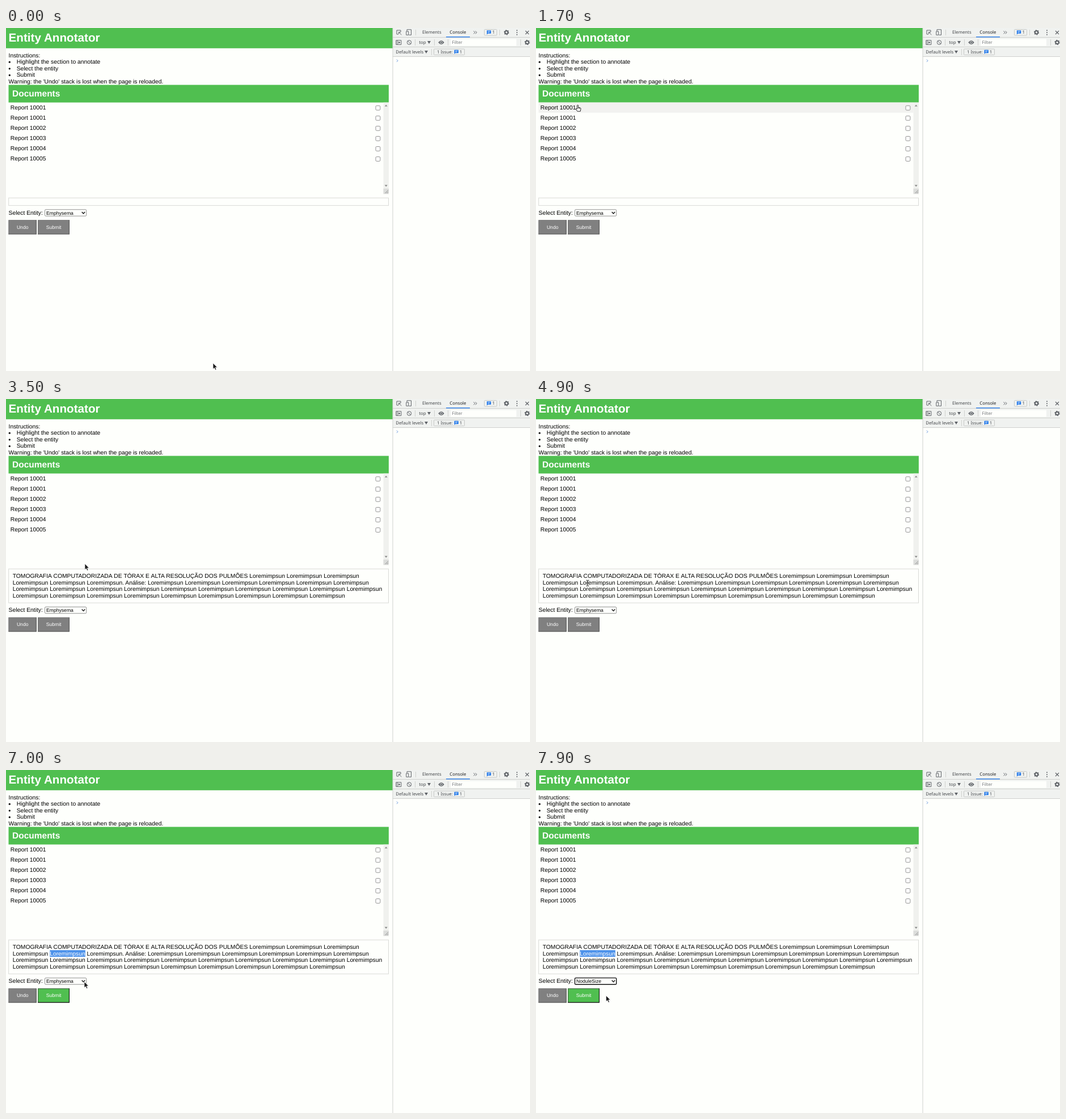
Animation, 924 px wide and 606 px high, one loop 8000 ms. Source, as an HTML page:

```html
<!DOCTYPE html>
<html lang="en">
<head>
<meta charset="utf-8">
<title>Entity Annotator</title>
<style>
  html, body { margin: 0; width: 100%; height: 100%; overflow: hidden; background: #fefffc; }
  svg { display: block; width: 924px; height: 606px; }
  text { font: 10.34px "Liberation Sans", Arial, sans-serif; fill: #000; text-rendering: geometricPrecision; white-space: pre; }
  .title { font-size: 20.67px; font-weight: bold; fill: #fff; }
  .heading { font-size: 15.5px; font-weight: bold; fill: #fff; }
  .control { font-size: 8.62px; }
  .button { font-size: 8.62px; fill: #fff; text-anchor: middle; }
  .caps { word-spacing: .22px; }
  .tools text { font: 7.75px "Noto Sans", "Open Sans", sans-serif; fill: #44474a; }
  .icon { fill: none; stroke: #5f6368; stroke-width: 1; }
  .solid { fill: #5f6368; }
  .rule { stroke: #cfd1ce; stroke-width: 1; }
  .frame { fill: #fefffc; stroke: #d9dad7; }
  .select { fill: #fefffc; stroke: #767676; stroke-width: .8; }
  .select.hover { stroke: #444; }
  .select.focus { stroke: #101010; stroke-width: 1.4; }
</style>
</head>
<body>
<svg viewBox="0 0 924 606">
  <defs>
    <g id="gear">
      <circle r="2.7" class="icon" style="stroke-width:2"/>
      <circle r="3.9" class="icon" style="stroke-width:1.5" stroke-dasharray="1.75 2.334"/>
    </g>
    <path id="drop" class="solid" d="M-3 -2.4H3L0 2.6Z"/>
    <g id="note">
      <path fill="#1a73e8" d="M-3.5 -3.3H3.8V2.2H-1.6L-3.5 4Z"/>
      <path stroke="#fff" stroke-width=".8" d="M-2 -1.5H2.4M-2 .4H1.4"/>
    </g>
    <path id="arrow" d="M0 0V10.6L2.4 8.4 4.2 12.2 6 11.4 4.3 7.7H7.6Z" fill="#1c1c1c" stroke="#fff" stroke-width=".7"/>
    <path id="hand" d="M-1.1 .7Q0 -.7 1.1 .7V4.4L4.4 5Q5.6 5.4 5.4 7L4.6 11.2H-.6L-3.6 7.2Q-3 5.6 -1.1 7.2ZM1.1 4.4V6.4M3 4.8V6.6" fill="#fff" stroke="#111" stroke-width=".9"/>
    <path id="beam" d="M-2.6 -5H-.7L0 -4.4.7 -5H2.6M-2.6 5H-.7L0 4.4.7 5H2.6M0 -4.4V4.4" fill="none" stroke="#222" stroke-width="1"/>
  </defs>

  <rect width="924" height="606" fill="#fefffc"/>
  <rect width="682" height="35.8" fill="#50bf50"/>
  <text class="title" x="4.6" y="24">Entity Annotator</text>
  <g id="intro"></g>
  <rect x="4.5" y="100.5" width="670.4" height="31.1" fill="#50bf50"/>
  <text class="heading" x="11" y="121">Documents</text>

  <rect id="hover" x="4.5" width="661" height="18.05" fill="#f2f2f0"/>
  <g id="rows"></g>
  <rect x="665.5" y="131.6" width="9.4" height="161.6" fill="#f0f1ee"/>
  <path fill="#8b8c8a" d="M667.7 138.6H672.7L670.2 135.4ZM667.7 277.2H672.7L670.2 280.4Z"/>
  <rect x="665.5" y="283.7" width="9.4" height="9.6" fill="#dcdddb"/>
  <path d="M668.5 292L674 286.5M671.5 292L674 289.5" stroke="#777" stroke-width=".8"/>

  <rect id="paper" class="frame" x="4.7" y="300.2" width="669.8" height="13.4"/>
  <g id="report">
    <rect id="mark" x="77.3" y="318.3" width="62.6" height="11.7" fill="#4b91ea"/>
  </g>

  <g id="form">
    <text x="4.6" y="329.7">Select Entity:</text>
    <rect id="select" class="select" x="68.5" y="320.8" width="73.2" height="11.4" rx="1.6"/>
    <text id="value" class="control" x="71" y="329.6"></text>
    <path d="M133.7 324.9L136.5 327.8 139.3 324.9" fill="none" stroke="#222" stroke-width="1.5"/>
    <g id="buttons"></g>
  </g>

  <g id="menu">
    <rect x="67" y="380.5" width="77" height="58.5" rx="1" fill="#000" opacity=".12"/>
    <rect x="68" y="379.6" width="74" height="58.6" fill="#fff" stroke="#b8b8b8" stroke-width=".7"/>
    <rect id="choice" x="68.4" width="73.2" height="11.6" fill="#cecece"/>
  </g>

  <g class="tools">
    <rect x="682" width="242" height="50.5" fill="#f0f2f0"/>
    <path class="rule" d="M682 0V606M682 16.5H924M682 33.5H924M682 50.5H924M722.5 3V13M870.5 3V13M721.5 20V31M755.5 20V31M779.5 20V31M907.5 20V31M750.5 37V48"/>
    <path class="icon" d="M696 7V4H689V11H692M692.6 7.3L697.4 12M692.6 10.6V7.3H696"/>
    <path class="icon" d="M707 5.5V2.8H714.5V12.3H710.5M705.8 6H709.8V12.3H705.8Z"/>
    <text x="734" y="10.3">Elements</text>
    <text x="782.3" y="10.3" style="fill:#202124">Console</text>
    <rect x="776" y="15.2" width="42" height="1.3" fill="#1a73e8"/>
    <path class="icon" d="M824.5 5.3L827 7.8 824.5 10.3M827.7 5.3L830.2 7.8 827.7 10.3"/>
    <rect class="icon" x="843.5" y="2.5" width="22" height="10.5" rx="1" style="stroke:#c6c8c6"/>
    <use href="#note" x="851.4" y="7.5"/>
    <text x="857.6" y="10.3">1</text>
    <use href="#gear" x="882.5" y="7.8"/>
    <g class="solid"><circle cx="901" cy="4.3" r="1"/><circle cx="901" cy="8" r="1"/><circle cx="901" cy="11.7" r="1"/></g>
    <path class="icon" d="M916 5L922 11M922 5L916 11" style="stroke-width:1.2"/>

    <path class="icon" d="M687.8 21.8H696.8V29.3H687.8ZM690 21.8V29.3"/>
    <path class="solid" d="M692 23.4L695.6 25.6 692 27.8Z"/>
    <circle class="icon" cx="711" cy="25.5" r="3.7"/><path class="icon" d="M708.4 22.9L713.6 28.1"/>
    <text x="728.3" y="28.2">top</text>
    <use href="#drop" x="746" y="25.5"/>
    <path class="solid" d="M762.3 25.5Q767.5 18.5 772.7 25.5 767.5 32.5 762.3 25.5Z"/>
    <circle cx="767.5" cy="25.5" r="1.9" fill="#5f6368" stroke="#f0f2f0" stroke-width=".9"/>
    <rect x="784" y="19.5" width="116" height="12" fill="#fefffc"/>
    <text x="786.4" y="28.2" style="fill:#74777a">Filter</text>
    <use href="#gear" x="919" y="25.4"/>

    <text x="687.3" y="45">Default levels</text>
    <use href="#drop" x="741" y="42.3"/>
    <rect class="icon" x="754.5" y="37" width="54" height="10.6" rx="1" style="stroke:#c6c8c6"/>
    <text x="760" y="45">1 Issue:</text>
    <use href="#note" x="794" y="42"/>
    <text x="799.8" y="45">1</text>
    <path d="M688.8 55.6L691 57.8 688.8 60" fill="none" stroke="#6f9be0" stroke-width="1"/>
  </g>
  <use id="cursor"/>
</svg>

<script>
const LOOP = 8000, ROW = 18.05, LIST_TOP = 131.6, ITEM = 11.6, MENU_TOP = 379.9;
const $ = id => document.getElementById(id);

function append(parent, name, attrs, content = '') {
  const node = document.createElementNS('http://www.w3.org/2000/svg', name);
  for (const key in attrs) node.setAttribute(key, attrs[key]);
  node.textContent = content;
  return parent.appendChild(node);
}
const add = (id, ...rest) => append($(id), ...rest);

const intro = ['Instructions:', 'Highlight the section to annotate', 'Select the entity', 'Submit',
  "Warning: the 'Undo' stack is lost when the page is reloaded."];
intro.forEach((line, i) => {
  const bullet = i > 0 && i < 4, y = 51.55 + i * 11.63;
  if (bullet) add('intro', 'circle', { cx: 6.3, cy: y - 3, r: 1.6 });
  add('intro', 'text', { x: bullet ? 18.7 : 4.6, y }, line);
});

[1, 1, 2, 3, 4, 5].forEach((number, i) => {
  add('rows', 'text', { x: 7.8, y: 144 + i * ROW }, 'Report 1000' + number);
  add('rows', 'rect', { x: 652, y: 137.3 + i * ROW, width: 7.8, height: 7.8, rx: 1.6,
    fill: '#fff', stroke: '#767676', 'stroke-width': .8 });
});

const lorem = count => Array(count).fill('Loremimpsun').join(' ');
const caps = 'TOMOGRAFIA COMPUTADORIZADA DE TÓRAX E ALTA RESOLUÇÃO DOS PULMÕES ';
const lines = [0, 1, 2, 3].map(i => add('report', 'text', { x: 11.7, y: 316 + i * 11.65 }));
append(lines[0], 'tspan', { class: 'caps' }, caps);
append(lines[0], 'tspan', {}, lorem(3));
append(lines[1], 'tspan', {}, 'Loremimpsun ');
const marked = append(lines[1], 'tspan', {}, 'Loremimpsun');
append(lines[1], 'tspan', {}, ' Loremimpsun. Análise: ' + lorem(6));
lines[2].textContent = lorem(10);
lines[3].textContent = lorem(9);

function button(x, width, label) {
  const top = 339.3, bottom = 364.5, right = x + width;
  const face = add('buttons', 'rect', { x, y: top, width, height: bottom - top });
  const edge = d => add('buttons', 'path', { d, fill: 'none', 'stroke-width': 1.1 });
  const light = edge(`M${x + .5} ${bottom}V${top + .5}H${right}`);
  const dark = edge(`M${x} ${bottom - .5}H${right - .5}V${top}`);
  add('buttons', 'text', { class: 'button', x: x + width / 2, y: 354.8 }, label);
  return enabled => {
    face.setAttribute('fill', enabled ? '#50bf50' : '#808080');
    light.setAttribute('stroke', enabled ? '#4a704a' : '#787878');
    dark.setAttribute('stroke', enabled ? '#111' : '#5a5a5a');
  };
}
const setUndo = button(4.5, 49.4, 'Undo');
const setSubmit = button(56.2, 55.8, 'Submit');
setUndo(false);

['Emphysema', 'Nodule', 'NoduleSize', 'Fibrosis', 'Opacity'].forEach((name, i) =>
  add('menu', 'text', { class: 'control', x: 71, y: MENU_TOP + 8.7 + i * ITEM }, name));

// time, x, y, shape
const path = [
  [0, 365, 592, 'arrow'], [200, 360, 595, 'arrow'], [300, 0, 0, ''],
  [1000, 299, 566, 'arrow'], [1100, 262, 490, 'arrow'], [1200, 214, 390, 'arrow'],
  [1300, 150, 268, 'arrow'], [1400, 92, 160, 'hand'], [1500, 75, 172, 'hand'],
  [1700, 73.6, 136, 'hand'], [3000, 75, 155, 'hand'], [3100, 81, 194, 'hand'],
  [3300, 100, 226, 'hand'], [3400, 122, 262, 'arrow'], [3500, 139, 291, 'arrow'],
  [3600, 151, 301, 'arrow'], [3700, 163, 309, 'beam'], [3800, 173, 314, 'beam'],
  [3900, 182, 318, 'beam'], [4000, 190, 320, 'beam'], [4100, 195, 321.5, 'beam'],
  [4200, 205, 316, 'beam'], [4300, 215, 323, 'beam'], [4400, 219, 330.5, 'beam'],
  [4600, 192, 333.5, 'beam'], [4700, 148, 332, 'beam'], [4800, 110, 328, 'beam'],
  [4900, 91, 325.3, 'beam'], [5400, 92, 324.6, 'beam'], [5800, 99, 334, 'beam'],
  [5900, 113, 347.5, 'beam'], [6100, 132, 358, 'arrow'], [6200, 144.5, 363.5, 'arrow'],
  [6400, 142, 367, 'arrow'], [6500, 139, 371, 'arrow'], [6600, 138, 373, 'arrow'],
  [7000, 138, 374, 'arrow'], [7200, 136, 380, 'arrow'], [7300, 132, 390, 'arrow'],
  [7400, 127, 401, 'arrow'], [7500, 124, 407, 'arrow'], [7700, 124, 398, 'arrow'],
  [7900, 123.5, 398.5, 'arrow']];

const show = (node, on) => node.setAttribute('visibility', on ? 'visible' : 'hidden');

function draw(t) {
  const [, x, y, shape] = path.filter(stop => stop[0] <= t).pop();
  const loaded = t >= 2400, selected = t >= 5700, chosen = t >= 7900;
  const menuOpen = t >= 7100 && t < 7700;

  show($('cursor'), shape);
  $('cursor').setAttribute('href', '#' + shape);
  $('cursor').setAttribute('transform', `translate(${x} ${y})`);
  show($('hover'), shape === 'hand');
  $('hover').setAttribute('y', LIST_TOP + Math.floor((y - LIST_TOP) / ROW) * ROW);

  $('paper').setAttribute('height', loaded ? 60 : 13.4);
  $('form').setAttribute('transform', `translate(0 ${loaded ? 46.6 : 0})`);
  $('report').setAttribute('display', loaded ? 'inline' : 'none');
  show($('mark'), selected);
  marked.setAttribute('fill', selected ? '#fff' : '#000');
  marked.style.fill = selected ? '#fff' : '#000';
  setSubmit(selected);

  const state = chosen ? ' focus' : t >= 6400 && t < 7000 ? ' hover' : '';
  $('select').setAttribute('class', 'select' + state);
  $('value').textContent = chosen ? 'NoduleSize' : 'Emphysema';
  show($('menu'), menuOpen);
  const item = Math.max(0, Math.floor((y - MENU_TOP) / ITEM));
  $('choice').setAttribute('y', MENU_TOP + item * ITEM);
}

let start;
function tick(now) {
  start ??= now;
  draw((now - start) % LOOP);
  requestAnimationFrame(tick);
}
draw(0);
requestAnimationFrame(tick);
</script>
</body>
</html>
```
